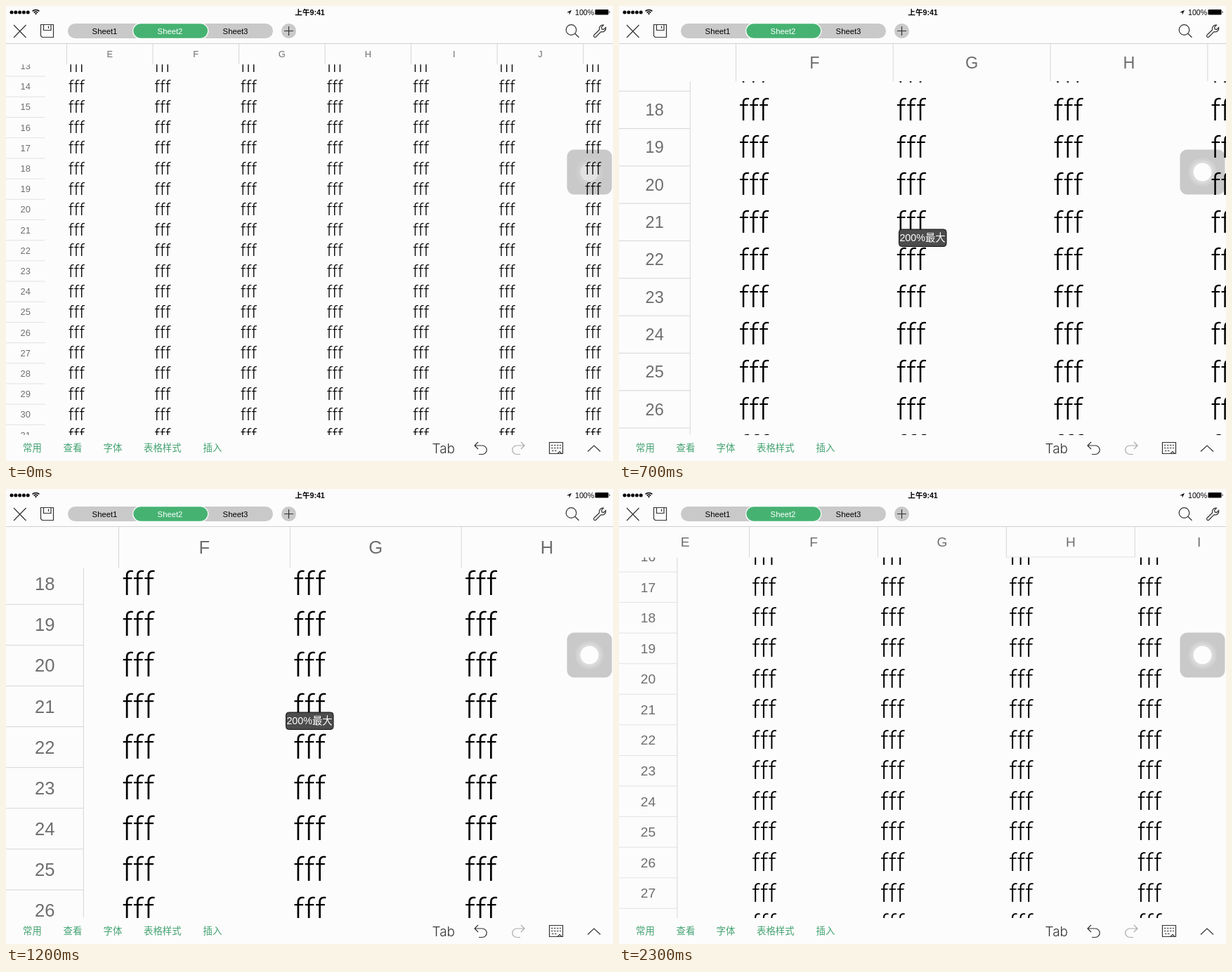
An HTML page with a canvas for the animation above (2.4 s loop, 864 px wide and 648 px high).

```html
<!DOCTYPE html>
<html lang="zh">
<head>
<meta charset="utf-8">
<style>
html, body { margin: 0; width: 864px; height: 648px; overflow: hidden; background: #fcfcfc; }
canvas, svg { position: absolute; left: 0; top: 0; }
svg { font-family: "Liberation Sans", Arial, "Noto Sans CJK SC", sans-serif; }
.line { fill: none; stroke: #333; stroke-width: 1.2; }
.menu { font-size: 13.4px; font-weight: 300; fill: #43a271; }
.tab { font-size: 11.3px; text-anchor: middle; }
.status { font-size: 10.6px; }
</style>
</head>
<body>
<canvas id="grid" width="864" height="648"></canvas>
<svg width="864" height="648">
  <!-- status bar -->
  <path d="M8 9h24" stroke="#000" stroke-width="5" stroke-linecap="round" stroke-dasharray="0 5.8"/>
  <path d="M37.6 7.4a7 7 0 0 1 9.8 0M39.6 9.5a4.2 4.2 0 0 1 5.8 0" fill="none" stroke="#000" stroke-width="1.5"/>
  <path d="M40.9 10.8a2.3 2.3 0 0 1 3.2 0l-1.6 1.7z"/>
  <text class="status" x="432.5" y="12.6" text-anchor="middle" font-weight="bold">上午9:41</text>
  <path d="M798 9.2l7-3.4-3.3 7v-3.6z"/>
  <text class="status" x="810" y="12.8">100%</text>
  <rect x="838.5" y="5" width="19" height="7.5" rx="1.2"/>
  <path d="M858.6 7.2v3a1.6 1.6 0 0 0 0-3z"/>

  <!-- toolbar -->
  <path d="M0 53.5h864" stroke="#cfcfcf"/>
  <path class="line" d="M11 27l17.5 18M28.5 27L11 45"/>
  <path class="line" d="M49.5 26.5h18v18h-16l-2-2zM53.5 26.5v8h10.5v-8M60.5 28.5v3.5"/>
  <rect x="88" y="25" width="292" height="21" rx="10.5" fill="#c9c9c9"/>
  <rect x="180.7" y="24.7" width="107" height="21.7" rx="10.8" fill="#46b272" stroke="#fff" stroke-width="1.2"/>
  <text class="tab" x="140.5" y="39.5">Sheet1</text>
  <text class="tab" x="233.5" y="39.5" fill="#fff">Sheet2</text>
  <text class="tab" x="326.5" y="39.5">Sheet3</text>
  <circle cx="402.5" cy="35.5" r="10.5" fill="#c9c9c9"/>
  <path class="line" d="M396 35.5h13M402.5 29v13"/>
  <g class="line">
    <circle cx="804.5" cy="34" r="7.3"/>
    <path d="M809.8 39.2l5.7 5.6"/>
    <path d="M837 41.3l7.5-7.3c-1-4 2-7.6 6-6.8l-3 3.2.7 2.5 2.5.6 3-3c.7 4.2-2.7 7.2-6.7 6.2l-7.3 7.3c-1.8 1.6-4.3-.9-2.7-2.7z"/>
  </g>

  <!-- bottom bar -->
  <g class="menu">
    <text x="24" y="634">常用</text>
    <text x="81.5" y="634">查看</text>
    <text x="138.5" y="634">字体</text>
    <text x="196" y="634">表格样式</text>
    <text x="280.5" y="634">插入</text>
  </g>
  <text x="606.5" y="637" font-size="19" font-weight="300" font-family="Inter, sans-serif" fill="#333">Tab</text>
  <path id="undo" class="line" d="M672 621l-5 5 5 5M667 626h11a6 6 0 0 1 0 12.5h-5"/>
  <use href="#undo" transform="matrix(-1 0 0 1 1405 0)" opacity=".4"/>
  <path class="line" d="M773.5 621.5h19v16h-19zM785 637.5l3-3 3 3"/>
  <path class="line" d="M776 625.5h14M776 629.5h14M777 633.5h8" stroke-dasharray="2.5 1.5"/>
  <path class="line" d="M828 634.5l9-8.5 9 8.5"/>

  <g id="tip">
    <rect x="398.5" y="318" width="67.5" height="24.5" rx="4" fill="#4c4c4c" stroke="#111"/>
    <text x="432" y="335.3" text-anchor="middle" font-size="14.3" font-weight="300" fill="#fff">200%最大</text>
  </g>
</svg>
<script>
const ctx = grid.getContext('2d');
const TOP = 54, BOTTOM = 611, LOOP = 2400;

// time, row height, left edge of column F, top edge of row 22
const keys = [
  [0, 29.19, 209, 333.7],
  [300, 45.95, 180.5, 328.7],
  [500, 50.75, 170.5, 330.2],
  [900, 55.87, 162.5, 338.8],
  [1200, 58.08, 160.5, 338.6],
  [1300, 58.08, 160.5, 338.6],
  [1500, 45, 183, 336.2],
  [1600, 43.57, 185.6, 335.9],
  [LOOP, 43.57, 185.6, 335.9]
];

function pose(t) {
  const i = keys.findIndex(k => k[0] > t), a = keys[i - 1], b = keys[i];
  const p = (t - a[0]) / (b[0] - a[0]);
  return a.map((v, n) => v + (b[n] - v) * p).slice(1);
}

function clipped(x, y, w, h, paint) {
  ctx.save();
  ctx.beginPath();
  ctx.rect(x, y, w, h);
  ctx.clip();
  paint();
  ctx.restore();
}

function line(x1, y1, x2, y2, color = '#d6d6d6') {
  ctx.strokeStyle = color;
  ctx.beginPath();
  ctx.moveTo(x1, y1);
  ctx.lineTo(x2, y2);
  ctx.stroke();
}

function label(text, x, y, size) {
  ctx.font = `${size}px "Liberation Sans", Arial, sans-serif`;
  ctx.fillStyle = '#6e6e6e';
  ctx.textAlign = 'center';
  ctx.fillText(text, x, y + size * 0.35);
}

function touchButton(dim) {
  ctx.fillStyle = '#c9c9c9';
  ctx.beginPath();
  ctx.roundRect(798.5, 204.5, 64, 64, 10);
  ctx.fill();
  for (const [radius, alpha] of [[20, 0.15], [16.5, 0.2], [13, 0.95]]) {
    ctx.fillStyle = `rgba(255,255,255,${dim ? alpha * 0.4 : alpha})`;
    ctx.beginPath();
    ctx.arc(830.5, 236.5, radius, 0, 7);
    ctx.fill();
  }
}

function draw(t) {
  const [row, left, mid] = pose(t);
  const col = row * 4.198, side = row * 1.9, head = TOP + row;
  const colX = c => left + (c - 5) * col;
  const rowY = n => mid + (n - 22) * row;

  ctx.clearRect(0, 0, 864, 648);
  const phase = ((830 - left) % col) / row;
  touchButton(phase > 0 && phase < 1);

  clipped(side, TOP, 864, row, () => {
    for (let c = 3; c < 12; c++) {
      const x = colX(c);
      line(x, TOP, x, head);
      label(String.fromCharCode(65 + c), x + col / 2, TOP + row / 2, row * 0.44);
    }
    if (t >= 1600) line(colX(7), head - 0.5, colX(8), head - 0.5);
  });

  clipped(0, head, side + 1, BOTTOM - head, () => {
    for (let n = 12; n < 33; n++) {
      const y = rowY(n);
      line(0, y, side, y, row < 44 ? '#e2e2e2' : '#d6d6d6');
      label(n, side / 2, y + row / 2, row * 0.44);
    }
    if (row > 40) line(side, head, side, BOTTOM);
  });

  clipped(side, head, 864, BOTTOM - head, () => {
    ctx.font = `300 ${row * 0.8}px Roboto, sans-serif`;
    ctx.letterSpacing = '0.01px'; // keeps the letters from joining
    ctx.fillStyle = '#000';
    ctx.textAlign = 'left';
    for (let c = 3; c < 12; c++)
      for (let n = 12; n < 33; n++)
        ctx.fillText('fff', colX(c) + row * 0.08, rowY(n) + row * 0.775);
  });

  tip.style.display = t >= 300 && t < 1400 ? '' : 'none';
}

// The screen refreshes ten times a second.
function tick() {
  draw(Math.floor(performance.now() % LOOP / 100) * 100);
  requestAnimationFrame(tick);
}
tick();
</script>
</body>
</html>
```
